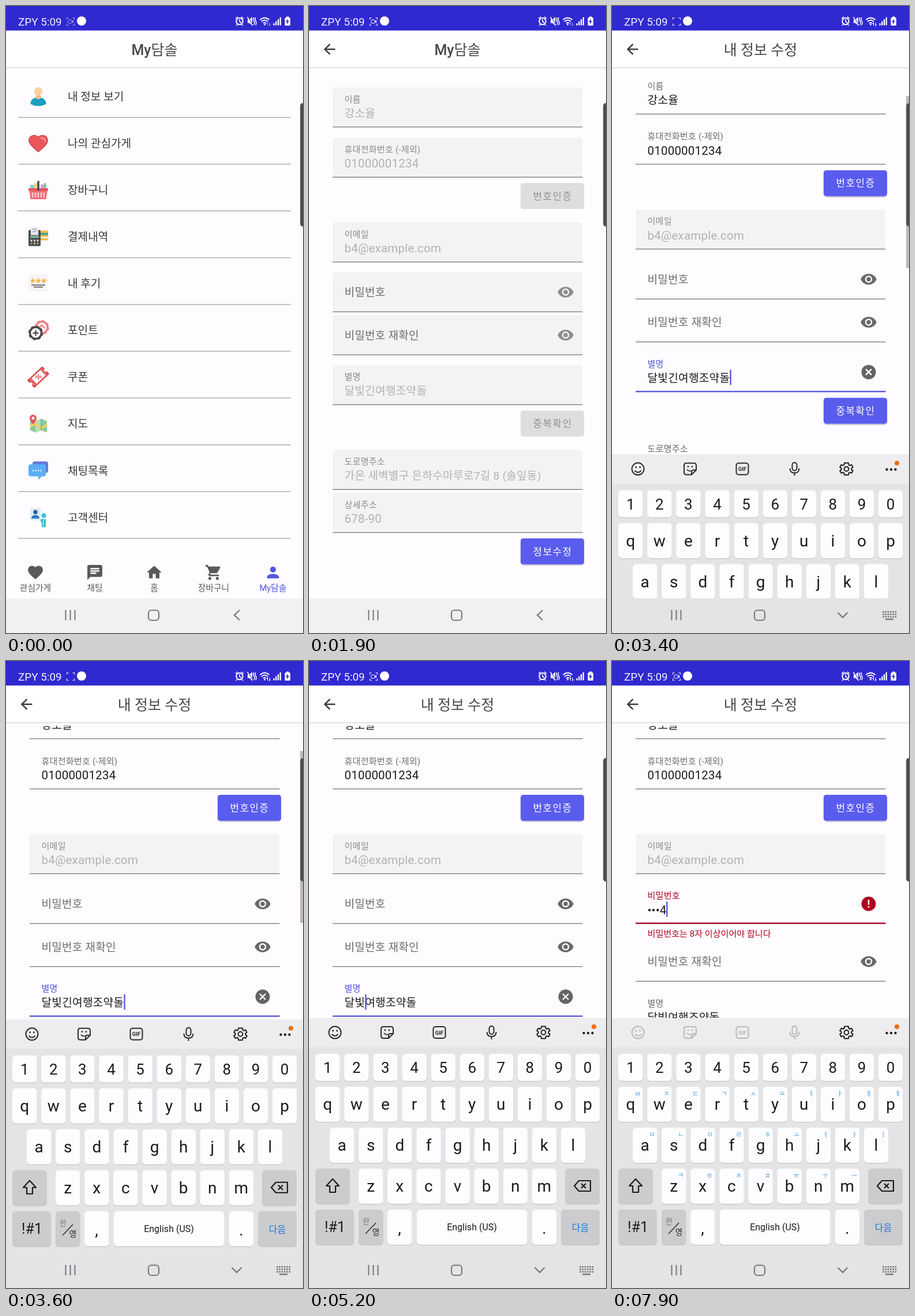
Recreate the animation shown at these times as an HTML page. Size 515x1087 px, loop 8000 ms.

```html
<!DOCTYPE html>
<html lang="ko">
<head>
<meta charset="utf-8">
<title>내 정보 수정</title>
<style>
html, body { margin: 0; width: 100%; height: 100%; overflow: hidden; background: #fefcff; }
svg { display: block; width: 100vw; height: 100vh; }
text { font-family: Roboto, "Noto Sans CJK KR", sans-serif; }
</style>
</head>
<body>
<svg id="stage" viewBox="0 0 515 1087"></svg>
<script>
const LOOP = 8000;
const BLUE = '#5658dc', BUTTON = '#5a5cee', RED = '#b00020', PAGE = '#fefcff', INK = '#1b1a1d';
const BRAND = 'My담솔';

// ---- Drawing helpers: each returns SVG markup ----
const attrs = o => Object.entries(o).map(([k, v]) => ` ${k}="${v}"`).join('');
const rect = (x, y, w, h, fill, rx = 0, o = {}) =>
  `<rect x="${x}" y="${y}" width="${w}" height="${h}" fill="${fill}" rx="${rx}"${attrs(o)}/>`;
const circle = (x, y, r, fill, o = {}) => `<circle cx="${x}" cy="${y}" r="${r}" fill="${fill}"${attrs(o)}/>`;
const shape = (d, fill, o = {}) => `<path d="${d}" fill="${fill}"${attrs(o)}/>`;
const line = (d, stroke, width = 2, o = {}) =>
  `<path d="${d}" fill="none" stroke="${stroke}" stroke-width="${width}"${attrs(o)}/>`;
const text = (x, cy, s, size, fill, o = {}) =>
  `<text x="${x}" y="${cy + size * .37}" font-size="${size}" fill="${fill}"${attrs(o)}>${s}</text>`;
const mid = { 'text-anchor': 'middle' };
const group = (body, transform = '', o = {}) => `<g transform="${transform}"${attrs(o)}>${body}</g>`;
const move = (x, y, body) => group(body, `translate(${x} ${y})`);
const glyph = (d, x, y, scale, fill) =>
  group(shape(d, fill, { 'fill-rule': 'evenodd' }), `translate(${x} ${y}) scale(${scale}) translate(-12 -12)`);

const clamp = v => Math.min(1, Math.max(0, v));
const progress = (t, from, to) => clamp((t - from) / (to - from));
const easeOut = p => 1 - (1 - p) ** 3;
const within = (t, from, to) => t >= from && t < to;

const HEART = 'M12 21.35l-1.45-1.32C5.4 15.36 2 12.28 2 8.5 2 5.42 4.42 3 7.5 3c1.74 0 3.41.81 4.5 2.09C13.09 3.81 14.76 3 16.5 3 19.58 3 22 5.42 22 8.5c0 3.78-3.4 6.86-8.55 11.54z';
const CHAT = 'M20 2H4c-1.1 0-2 .9-2 2v18l4-4h14c1.1 0 2-.9 2-2V4c0-1.1-.9-2-2-2zM6 9h12v2H6zm8 5H6v-2h8zm4-6H6V6h12z';
const HOME = 'M10 20v-6h4v6h5v-8h3L12 3 2 12h3v8z';
const CART = 'M7 18a2 2 0 1 0 0 4 2 2 0 0 0 0-4zM1 2v2h2l3.6 7.59-1.35 2.45C4.5 15.4 5.5 17 7 17h12v-2H7.42a.25.25 0 0 1-.22-.37l.9-1.63h7.45c.75 0 1.41-.41 1.75-1.03l3.58-6.49A1 1 0 0 0 20 4H5.21l-.94-2zm16 16a2 2 0 1 0 0 4 2 2 0 0 0 0-4z';
const PERSON = 'M12 12a4 4 0 1 0 0-8 4 4 0 0 0 0 8zm0 2c-2.67 0-8 1.34-8 4v2h16v-2c0-2.66-5.33-4-8-4z';
const EYE = 'M12 4.5C7 4.5 2.73 7.61 1 12c1.73 4.39 6 7.5 11 7.5s9.27-3.11 11-7.5c-1.73-4.39-6-7.5-11-7.5zM12 17a5 5 0 1 1 0-10 5 5 0 0 1 0 10zm0-8a3 3 0 1 0 0 6 3 3 0 0 0 0-6z';
const BACK = 'M20 11H7.83l5.59-5.59L12 4l-8 8 8 8 1.41-1.41L7.83 13H20z';
const GEAR = 'M19.4 13a7 7 0 0 0 0-2l2.1-1.6-2-3.5-2.5 1a7 7 0 0 0-1.7-1L15 3.2H9l-.4 2.7a7 7 0 0 0-1.7 1l-2.5-1-2 3.5L4.5 11a7 7 0 0 0 0 2l-2.1 1.6 2 3.5 2.5-1a7 7 0 0 0 1.7 1l.4 2.7h6l.4-2.7a7 7 0 0 0 1.7-1l2.5 1 2-3.5z';

// ---- Status bar ----
function statusBar(t) {
  const recording = t % 1000 < 400 || t % 1000 >= 900;
  const w = '#fff';
  const camera = recording ? rect(108, 24, 6, 6, 'none', 1, { stroke: w }) + shape('M114 27l3-3v6z', w) : '';
  const brackets = line('M105.5 23.5v-3h3M115.5 20.5h3v3M118.5 30.5v3h-3M108.5 33.5h-3v-3', w, 1.1);
  return rect(0, 0, 515, 42.5, '#3029cf') + text(21, 27, 'ZPY 5:09', 18.9, '#f1f0ff') +
    group(camera + brackets, '', { opacity: t < 100 ? .55 : .95 }) + circle(131, 26, 8, w) +
    circle(405, 26.5, 5.7, 'none', { stroke: w, 'stroke-width': 2 }) +
    line('M405 23v4l3 2M398 22l4-3.5M412 22l-4-3.5M401 32l-2 2M409 32l2 2', w, 1.6) +
    shape('M419 23.5h3l5-4.5v15l-5-4.5h-3z', w) + line('M419 19l9 15', '#3029cf', 2.5) +
    line('M418.5 19l9 15M430 20q-2 3 0 6t0 7M433 20q-2 3 0 6t0 7', w, 1.5) +
    line('M440.5 24q8-7 16 0M443 27q5.5-5 11 0M446 30q2.500-2.500 5 0', w, 1.7) + circle(448.500, 32, 1.5, w) +
    line('M453.500 34v-5l-1.500 2M457 29v5l1.500-2', w, 1.1, { opacity: t < 3200 ? .5 : 1 }) +
    [0, 1, 2, 3].map(i => rect(463.5 + i * 3.7, 30 - i * 3.5, 2.3, 3.5 + i * 3.5, w)).join('') +
    rect(483.500, 20, 9.5, 14, w, 1.5) + rect(486, 18.3, 4.500, 3, w) + shape('M489 21.500l-4 6h2.500l-1 5 4.500-6.500h-2.700z', '#3029cf');
}

function appBar(title, back) {
  return rect(0, 42.500, 515, 64, '#fff') + rect(0, 106, 515, 1.3, '#d9d8db') + rect(0, 107.3, 515, 1.500, '#f1f0f3') +
    text(257.5, 75.5, title, 25, '#48474a', { ...mid, 'font-weight': 500 }) +
    (back ? glyph(BACK, 35.5, 75, 1.23, '#39383b') : '');
}

// ---- Menu page ----
const star = x => shape(`M${x} -10l1.400 3.200 3.500.400-2.600 2.300.8 3.500-3.100-1.800-3.100 1.800.8-3.500-2.600-2.300 3.500-.400z`, '#f8b64c');
const cog = (x, y, color) => circle(x, y, 10, '#fff', { stroke: color, 'stroke-width': 3.500 }) +
  circle(x, y, 11.500, 'none', { stroke: color, 'stroke-width': 2.5, 'stroke-dasharray': '5 4.030' });

const menuIcons = [
  () => shape('M-13.500 13q0-10 10-11h7q10 1 10 11-13.500 7-27 0z', '#1d9dbf') + shape('M-5 1q5 8 10 0l-2-4h-6z', '#f3bd87') + circle(0, -9, 7.3, '#fdd0a2'),
  () => group(shape(HEART, '#e9575c', { stroke: '#c9444b', 'stroke-width': .8 }), 'translate(0 .5) scale(1.63 1.570) translate(-12 -12.200)') +
    line('M5-9q7-1 7 6', '#f79a9d', 2.5, { 'stroke-linecap': 'round' }),
  () => rect(-14, -9, 7, 10, '#7ccfd8', 2) + rect(-7, -12, 6, 13, '#f7d66f', 2) + rect(4, -10, 5, 10, '#c7a5d8', 2) + rect(9, -12, 5, 12, '#8dc6a0', 2) +
    shape('M-16 0h32l-2.500 16h-27z', '#f16f78') + rect(-17, -3, 34, 4.500, '#e25560', 1) + rect(-1.7, -16, 3.500, 17, '#474955', 1) +
    [-10, -5, 0, 5, 10].map(x => rect(x - 1.2, 4, 2.4, 9, '#ffd3d3', 1)).join(''),
  () => rect(0, -11, 17, 17, '#f7b84a', 2) + rect(3, -7, 14, 4, '#45a687') + rect(3, 0, 14, 2, '#fff') +
    rect(-17, -12, 21, 28, '#4a4d52', 2) + rect(-13, -17, 13, 14, '#e7e9ec') + line('M-10-13h7M-10-9h7', '#9aa0a6', 1.5) + rect(-14, -2, 15, 4, '#7fae8d') +
    ['#ddd', '#ddd', '#ddd', '#ee6666', '#f4bd50', '#67b879'].map((c, i) => circle(-12 + i % 3 * 5.500, i < 3 ? 6.500 : 11.500, 1.700, c)).join(''),
  () => shape('M-14-16h28q3 0 3 3v23q0 3-3 3h-9l-5 4-5-4h-9q-3 0-3-3v-23q0-3 3-3z', '#f5f4f7') + star(-9.500) + star(0) + star(9.500) +
    line('M-12 2.5h24M-8 6h16', '#4b4a50', 1.500),
  () => cog(6, -5, '#f08186') + line('M2-5l4-4 5 5', '#f08186', 2.5) + cog(-4.500, 4.500, '#4d484a') + line('M-9.500 4.500h10M-4.500-.500v10', '#4d484a', 2.300),
  () => group(rect(-18, -9, 36, 18, '#dd4747', 1.500) + rect(-15, -6.500, 30, 13, '#fff') + rect(-15, -6.500, 5, 13, '#e96161') + rect(11, -6.500, 4, 13, '#e96161') +
    circle(-18, 0, 3, PAGE) + circle(18, 0, 3, PAGE) + line('M-3 3.500l7-7', '#dd4747', 1.500) +
    circle(-2, -2.500, 1.600, 'none', { stroke: '#dd4747' }) + circle(3, 2.500, 1.600, 'none', { stroke: '#dd4747' }), 'rotate(-43)'),
  () => shape('M-14-9l9 4 10-4 10 4V15l-10-4-10 4-9-4z', '#8acb98') + shape('M-5-5l10-4v20l-10 4z', '#b4dfab') +
    line('M-14 4q8-7 14 0t15-3', '#f5cf62', 4) + line('M5-8v19', '#71b7cc', 2) + shape('M-9 1q-6-7-6-11a6 6 0 0 1 12 0q0 4-6 11z', '#e5545a') + circle(-9, -10, 2.500, '#fff'),
  () => rect(-10, -16, 27, 20, '#6678d4', 4) + shape('M-13-11h22q4 0 4 4V6q0 4-4 4H6L0 16v-6h-13q-4 0-4-4V-7q0-4 4-4z', '#5aaef5') +
    [-9, -4.500, 0, 4.500].map(x => circle(x, 0, 1.2, '#fff')).join(''),
  () => rect(-14, -16, 18, 21, '#dcecf8') + circle(-5, -9, 3.700, '#235d9e') + shape('M-12 2q0-6 7-6t7 6z', '#2d75b8') +
    circle(9.500, -3, 4.200, '#43c4cf') + shape('M4 3h9v14H6V8H4z', '#39bdc9') + rect(8, 4, 2, 12, '#8be2e5')
];
const menuLabels = ['내 정보 보기', '나의 관심가게', '장바구니', '결제내역', '내 후기', '포인트', '쿠폰', '지도', '채팅목록', '고객센터'];
const tabs = [[HEART, '관심가게'], [CHAT, '채팅'], [HOME, '홈'], [CART, '장바구니'], [PERSON, BRAND]];

function menuPage(t) {
  const rows = menuLabels.map((label, i) => {
    const y = 157 + i * 81.06;
    return move(56, y, menuIcons[i]()) + text(107, y, label, 19.1, '#39383b') + rect(21, y + 35.5, 473, 1.500, '#aeadb0', .7);
  }).join('');
  const ripple = rect(21, 121, 473, 72, '#000', 4, { opacity: .1 * progress(t, 50, 200) });
  const nav = tabs.map(([icon, label], i) => {
    const x = 51 + i * 103, color = i === 4 ? BLUE : '#59585b';
    return glyph(icon, x, 982, 1.29, color) + text(x, 1009, label, 14.8, color, mid);
  }).join('');
  return rect(0, 107, 515, 920, PAGE) + rows + ripple + nav;
}

// ---- Profile form ----
const eye = (y, off) => glyph(EYE, 445, y + 34.5, 1.25, off ? '#8f8e91' : '#69686b');
const clearIcon = y => circle(445, y + 34.5, 12.5, '#646366') + line(`M440 ${y + 29.5}l10 10m0-10l-10 10`, '#fff', 2.4);
const errorIcon = y => circle(445, y + 34.5, 12.5, RED) + rect(443.700, y + 27.500, 2.6, 8.500, '#fff') + rect(443.700, y + 38.500, 2.6, 2.6, '#fff');

function field({ y, label, value = '', off, tint, float = value ? 1 : 0, icon = '', caret }) {
  const latin = /^[\x20-\x7e•]+$/.test(value);
  const spacing = { 'letter-spacing': .2 };
  return (off ? shape(`M41 ${y + 69}v-64q0-5 5-5h423q5 0 5 5v64z`, '#f3f2f4') : '') +
    text(61.5, y + 34.5 - 14.5 * float, label, 19.1 - 4 * float, tint || (float && off ? '#8b8a8d' : '#6d6c6f'), spacing) +
    text(61.5, y + 44.5, value, latin ? 20.5 : 19.2, off ? '#b2b1b4' : INK, spacing) +
    (tint ? rect(41, y + 67, 433.5, 2.4, tint) : rect(41, y + 68, 433.5, 1.4, '#818083')) +
    (caret ? rect(caret, y + 30.5, 2.4, 26.5, BLUE) : '') + icon;
}

function button(y, label, off, pressed = 0) {
  const shadow = off ? '' : rect(367.500, y + 2, 109, 45, '#b9b8cc', 5) + rect(366.5, y + 1, 111, 45, '#d5d4e4', 5);
  return shadow + rect(367, y, 110, 45, off ? '#dedde0' : BUTTON, 4.5) + rect(367, y, 110, 45, '#fff', 4.5, { opacity: pressed }) +
    text(422.5, y + 22.5, label, 16.9, off ? '#8f8e91' : '#fff', { ...mid, 'font-weight': 500, 'letter-spacing': 1.5 });
}

const caretResets = [3200, 4300, 5100, 5900, 6700, 7300, 7600, 7900];
const caretOn = t => (t - caretResets.filter(r => r <= t).pop()) % 1000 < 500;
const passwordAt = t => t < 6600 ? '' : t < 7300 ? '1' : t < 7600 ? '•2' : t < 7900 ? '••3' : '•••4';

function formPage(t, editing) {
  const off = !editing;
  const onName = within(t, 3200, 5900), onPassword = t >= 5900, error = t >= 6600;
  const scroll = 75 * easeOut(progress(t, 3380, 3560));
  const drop = error ? 25.5 : 0;
  const name = t < 5100 ? '달빛긴여행조약돌' : '달빛여행조약돌';
  const letters = t < 4300 ? 8 : t < 5100 ? 3 : 2;
  const nameCaret = 61.5 + 17.86 * letters;
  const password = passwordAt(t);
  const passwordCaret = 61.5 + (password ? 6.95 * password.length + 4.8 : 0);
  const helper = error ? text(61.5, 547 - 6 * (1 - easeOut(progress(t, 6600, 6900))), '비밀번호는 8자 이상이어야 합니다', 15.1, RED) : '';
  const handle = within(t, 4300, 5000)
    ? shape(`M${nameCaret + 1} 680l9 8a13 13 0 1 1-18 0z`, BUTTON) : '';
  const upper = [
    field({ y: 141, label: '이름', value: '강소율', off }),
    field({ y: 228, label: '휴대전화번호 (-제외)', value: '01000001234', off }),
    button(307, '번호인증', off),
    field({ y: 375, label: '이메일', value: 'b4@example.com', off: true }),
    field({
      y: 461.5, label: '비밀번호', off, value: password,
      float: onPassword ? progress(t, 5850, 6050) : 0,
      tint: error ? RED : onPassword && BLUE,
      icon: error ? errorIcon(461.5) : eye(461.5, off),
      caret: onPassword && caretOn(t) && passwordCaret
    }), helper
  ].join('');
  const lower = [
    field({ y: 536, label: '비밀번호 재확인', off, icon: eye(536, off) }),
    field({
      y: 622.5, label: '별명', value: name, off, tint: onName && BLUE,
      icon: onName ? clearIcon(622.5) : '', caret: onName && caretOn(t) && nameCaret
    }),
    button(701.5, '중복확인', off),
    field({ y: 769.5, label: '도로명주소', value: '가온 새벽별구 은하수마루로7길 8 (솔잎동)', off }),
    field({ y: 844, label: '상세주소', value: '678-90', off }),
    button(923, editing ? '수정완료' : '정보수정', false, within(t, 2080, 2300) ? .2 : 0), handle
  ].join('');
  return rect(0, 107, 515, 920, PAGE) + group(move(0, -scroll, upper + move(0, drop, lower)), '', { 'clip-path': 'url(#page)' });
}

// ---- Keyboard ----
const keyRows = [
  { y: 681, x: 11, h: 47, keys: '1234567890', hints: '' },
  { y: 738, x: 11, h: 61, keys: 'qwertyuiop', hints: 'ㅂㅈㄷㄱㅅㅛㅕㅑㅐㅔ' },
  { y: 809, x: 36, h: 61, keys: 'asdfghjkl', hints: 'ㅁㄴㅇㄹㅎㅗㅓㅏㅣ' },
  { y: 880, x: 86, h: 61, keys: 'zxcvbnm', hints: 'ㅋㅌㅊㅍㅠㅜㅡ' }
];
const presses = [['⌫', 4950, 5150], ['1', 6550, 6660], ['2', 7200, 7290], ['3', 7560, 7650], ['4', 7820, 7890]];
const isPressed = (t, key) => presses.some(([k, from, to]) => k === key && within(t, from, to));
const keycap = (x, y, w, h, fill) => rect(x, y + 1.3, w, h, '#c6c5c9', 6) + rect(x, y, w, h, fill, 6);
const GREY_KEY = '#cccbce', DOWN_KEY = '#b5b4b8';

function toolbar(dim) {
  const c = dim ? '#b9b8bb' : '#2b2a2d', dark = '#222124';
  const smile = circle(45, 644, 10.5, 'none', { stroke: c, 'stroke-width': 2 }) + circle(41.5, 641, 1.5, c) + circle(48.5, 641, 1.5, c) + line('M39.500 647q5.500 6 11 0', c);
  const sticker = line('M129 634h13q4 0 4 4v8l-8 8h-9q-4 0-4-4v-12q0-4 4-4zM146 646h-5q-3 0-3 3v5', c) + circle(132, 640, 1.4, c) + circle(139, 640, 1.4, c) + line('M130 645q3 4 7 2', c, 1.700);
  const gif = rect(215.500, 634, 21, 20, 'none', 4, { stroke: c, 'stroke-width': 2 }) + text(226, 644, 'GIF', 9.500, c, { ...mid, 'font-weight': 700 });
  const mic = rect(312.500, 633, 8, 14, 'none', 4, { stroke: c, 'stroke-width': 2 }) + line('M308.500 643q0 8 8 8t8-8M316.500 651v5', c);
  const gear = group(line(GEAR, dark, 1.700, { 'stroke-linejoin': 'round' }) + circle(12, 12, 3.300, 'none', { stroke: dark, 'stroke-width': 1.700 }), 'translate(406.500 644) scale(1.180) translate(-12 -12)');
  const more = [476.500, 484, 491.500].map(x => circle(x, 645, 2.2, dark)).join('') + circle(494, 634, 4, '#ef6c0b');
  return smile + sticker + gif + mic + gear + more;
}

function keyboard(t) {
  const hinted = t >= 6000;
  const letters = keyRows.map(({ y, x, h, keys, hints }) => [...keys].map((key, i) => {
    const left = x + i * 50.1;
    return keycap(left, y, 42.5, h, isPressed(t, key) ? GREY_KEY : '#fdfcff') +
      text(left + 21.2, y + h / 2 - (hints ? .5 : 0), key, hints ? 28 : 26, INK, mid) +
      (hinted && hints ? text(left + 33.5, y + 12, hints[i], 11.5, '#489fe5', mid) : '');
  }).join('')).join('');
  const special = keycap(11, 880, 60, 61, GREY_KEY) + line('M41 898l-11 12h6v11h10v-11h6z', INK, 2.2, { 'stroke-linejoin': 'round' }) +
    keycap(444, 880, 60, 61, isPressed(t, '⌫') ? DOWN_KEY : GREY_KEY) + line('M460 910l8-9h20v18h-20zM472 906l8 8m0-8l-8 8', INK, 2.2, { 'stroke-linejoin': 'round' }) +
    keycap(11, 951, 67, 61, GREY_KEY) + text(45, 981, '!#1', 25, INK, mid) +
    keycap(86, 951, 42.5, 61, GREY_KEY) + text(99, 971, '한', 13, '#78777a', mid) + line('M98 993l18-19', INK, 1.2) + text(116, 990, '영', 13.500, INK, mid) +
    keycap(136, 951, 42.5, 61, '#fdfcff') + text(157, 983, ',', 28, INK, mid) +
    keycap(187, 951, 191.5, 61, '#fdfcff') + text(282.5, 981.5, 'English (US)', 16, INK, mid) +
    keycap(387, 951, 42, 61, '#fdfcff') + text(408, 983, '.', 28, INK, mid) +
    keycap(437, 951, 67, 61, GREY_KEY) + text(470.5, 982, '다음', 16, '#1478e0', mid);
  return rect(0, 619, 515, 470, '#e4e3e6') + rect(0, 619, 515, 50.5, '#edecef') + toolbar(hinted) + letters + special;
}

function systemNav(typing) {
  const c = '#7b7a7d';
  const keys = [0, 1, 2].map(row => [0, 1, 2, 3, 4, 5].map(i => rect(469 + i * 4.3, 1049 + row * 4.300, 2.700, 2.700, c)).join('')).join('');
  return rect(0, 1027, 515, 60, typing ? '#e4e3e6' : '#f1f0f2') + line('M103.5 1047v18M111.5 1047v18M119.500 1047v18', c, 2.1) +
    rect(247, 1047.5, 18, 17.5, 'none', 5, { stroke: c, 'stroke-width': 2.2 }) +
    (typing ? line('M391.500 1051.500l8.500 8.500 8.500-8.500', c, 2.400) + keys + rect(474, 1062, 14, 2.500, c) : line('M405 1047.500l-9 8.500 9 8.500', c, 2.4));
}

function edgeHandle(t) {
  const bar = .9 * progress(t, 3300, 3400) * (1 - progress(t, 3700, 4000));
  return rect(510, 156, 5, 298, '#b3b2b5', 0, { opacity: bar }) +
    rect(510, 168, 10, 214.5, '#4a494c', 5, { stroke: '#bdbcbf', 'stroke-width': .8 });
}

const fade = (body, p) => p <= 0 ? '' : p >= 1 ? body : group(body, '', { opacity: p });

function scene(t) {
  const toForm = progress(t, 180, 400), toEdit = progress(t, 2200, 2500);
  const typing = t >= 3300;
  const slide = 408 * (1 - easeOut(progress(t, 3300, 3670)));
  return '<defs><clipPath id="page"><rect y="112.5" width="515" height="915"/></clipPath></defs>' +
    rect(0, 0, 515, 1087, PAGE) +
    (toForm < 1 ? menuPage(t) : '') +
    (toEdit < 1 ? fade(formPage(t, false), toForm) : '') +
    fade(formPage(t, true), toEdit) +
    appBar(t < 2300 ? BRAND : '내 정보 수정', t >= 250) + statusBar(t) +
    (typing ? move(0, slide, keyboard(t)) : '') + systemNav(typing) + edgeHandle(t);
}

const stage = document.getElementById('stage');
let start, shown;
function tick(now) {
  start ??= now;
  const markup = scene((now - start) % LOOP);
  if (markup !== shown) stage.innerHTML = shown = markup;
  requestAnimationFrame(tick);
}
requestAnimationFrame(tick);
</script>
</body>
</html>
```
